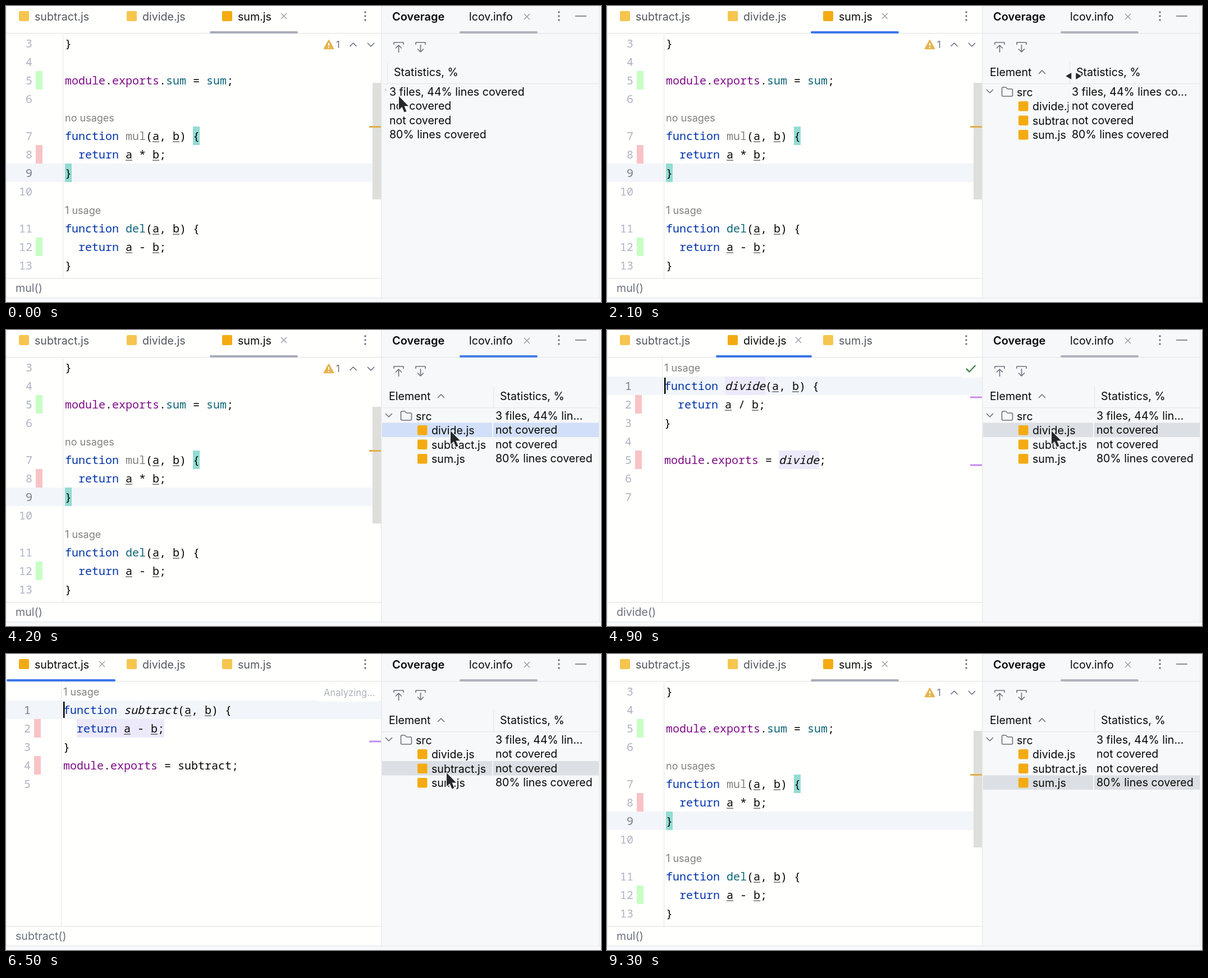
An HTML page with a canvas for the animation above (9400 ms loop, 1060 px wide and 528 px high).

```html
<!DOCTYPE html>
<html lang="en">
<head>
<meta charset="utf-8">
<title>Coverage panel</title>
<style>
  html, body { margin: 0; width: 100%; height: 100%; overflow: hidden; background: #fffffd; }
  canvas { display: block; }
</style>
</head>
<body>
<canvas id="stage" width="1060" height="528"></canvas>
<script>
const ctx = document.getElementById('stage').getContext('2d');
const LOOP = 9400, STEP = 100, LINE = 33, TOP = 50, CHAR = 12;
const UI = '19.6px Inter, sans-serif';
const HINT = '18px Inter, sans-serif';
const SMALL = '16.6px Inter, sans-serif';
const MONO = '20px "Noto Sans Mono", monospace';
const PAPER = '#fffffd', PANEL = '#f6f8f9', RULE = '#e7e9ec', ICON = '#6c707e';
const BLUE = '#3a76ea', IDLE = '#a9acba';
const GREEN = '#c8fdc4', RED = '#f8c3c6', BRACE = '#93dbd2', LAVENDER = '#ece9fa';
const INK = { k: '#0033a8', p: '#7d0b87', t: '#0b6478', g: '#808080', u: '#080808', i: '#080808' };

// Markup: <style:text>; lines starting with # are usage hints without a number.
const files = {
  subtract: {
    first: 1, current: 1, numbers: 44, x: 102, gutter: 98, crumb: 'subtract()',
    lines: ['#1 usage', '<k:function> <i:subtract>(<u:a>, <u:b>) {', '  <k:return> <u:a> - <u:b>;', '}',
      '<p:module>.<p:exports> = subtract;', ''],
    coverage: { 2: RED, 4: RED },
    marks: [[2, 2, 13, LAVENDER]], stripes: [156]
  },
  divide: {
    first: 1, current: 1, numbers: 44, x: 102, gutter: 98, crumb: 'divide()',
    lines: ['#1 usage', '<k:function> <i:divide>(<u:a>, <u:b>) {', '  <k:return> <u:a> / <u:b>;', '}', '',
      '<p:module>.<p:exports> = <i:divide>;', '', ''],
    coverage: { 2: RED, 5: RED },
    marks: [[1, 9, 6, LAVENDER], [5, 17, 6, LAVENDER]], stripes: [120, 241]
  },
  sum: {
    first: 3, current: 7, numbers: 47, x: 105, gutter: 101, crumb: 'mul()',
    lines: ['}', '', '<p:module>.<p:exports>.<t:sum> = <t:sum>;', '', '#no usages',
      '<k:function> <g:mul>(<u:a>, <u:b>) {', '  <k:return> <u:a> * <u:b>;', '}', '', '#1 usage',
      '<k:function> <t:del>(<u:a>, <u:b>) {', '  <k:return> <u:a> - <u:b>;', '}'],
    coverage: { 2: GREEN, 6: RED, 11: GREEN },
    marks: [[5, 19, 1, BRACE], [7, 0, 1, BRACE]], stripes: []
  }
};
const tabs = [
  { id: 'subtract', icon: 23, label: 51, close: 171, from: 1, to: 195 },
  { id: 'divide', icon: 215, label: 243, close: 341, from: 194, to: 365 },
  { id: 'sum', icon: 385, label: 413, close: 495, from: 363, to: 520 }
];
const stats = ['3 files, 44% lines covered', 'not covered', 'not covered', '80% lines covered'];

// Keys are [time, value, ...]; values are interpolated linearly.
const dividerKeys = [[1300, 679], [1600, 714], [2300, 868]];
const pointerKeys = [
  [300, 700, 161], [900, 702, 126], [1100, 694, 119], [1300, 694, 119], [1600, 722, 120],
  [2300, 875, 127], [2600, 875, 139], [2800, 875, 141], [3700, 796, 176], [4000, 792, 180],
  [5100, 792, 180], [5400, 788, 212], [5500, 786, 203], [6300, 786, 203], [6900, 783, 230],
  [8500, 783, 230], [9200, 1015, 12]
];

function track(keys, t) {
  const next = keys.findIndex(k => k[0] > t);
  if (next === 0) return keys[0].slice(1);
  if (next < 0) return keys[keys.length - 1].slice(1);
  const a = keys[next - 1], b = keys[next], f = (t - a[0]) / (b[0] - a[0]);
  return a.slice(1).map((v, i) => v + (b[i + 1] - v) * f);
}

const between = (t, a, b) => t >= a && t < b;

function stateAt(t) {
  const file = between(t, 4500, 6100) ? 'divide' : between(t, 6100, 7800) ? 'subtract' : 'sum';
  const panelFocus = between(t, 4200, 4500) || between(t, 5700, 6100) || between(t, 7300, 7800);
  const windowFocus = between(t, 1400, 9300);
  const blink = start => (t - start) % 1000 < 500;
  return {
    file, panelFocus,
    editorFocus: windowFocus && !panelFocus,
    caret: between(t, 1400, 4200) && blink(1400) || between(t, 4500, 5000) ||
      between(t, 6100, 7300) && blink(6100) || between(t, 7800, 8700),
    analyzing: between(t, 4500, 4900) || between(t, 6100, 6700),
    bulb: between(t, 5700, 6100) || between(t, 7100, 7800),
    selected: t < 4200 ? 0 : t < 5700 ? 1 : t < 7300 ? 2 : 3,
    divider: track(dividerKeys, t)[0],
    pointer: t < 9300 ? track(pointerKeys, t) : null,
    resizing: between(t, 1000, 2900)
  };
}

function box(x, y, w, h, color) {
  ctx.fillStyle = color;
  ctx.fillRect(x, y, w, h);
}

function rounded(x, y, w, h, r, color) {
  ctx.fillStyle = color;
  ctx.beginPath();
  ctx.roundRect(x, y, w, h, r);
  ctx.fill();
}

function text(string, x, y, color = '#080808', font = UI) {
  ctx.font = font;
  ctx.fillStyle = color;
  ctx.fillText(string, x, y);
}

function stroke(path, color = ICON, width = 1.6) {
  ctx.strokeStyle = color;
  ctx.lineWidth = width;
  ctx.stroke(new Path2D(path));
}

function polygon(path, x, y) {
  ctx.save();
  ctx.translate(x, y);
  const shape = new Path2D(path);
  ctx.lineJoin = 'round';
  ctx.strokeStyle = '#fff';
  ctx.lineWidth = 2.5;
  ctx.stroke(shape);
  ctx.fillStyle = '#25282c';
  ctx.fill(shape);
  ctx.restore();
}

const cross = (x, y) => stroke(`M${x - 5} ${y - 5}l10 10m0 -10l-10 10`, '#9598a5', 1.4);
const chevron = (x, y, dir) => stroke(`M${x - 6} ${y - 3 * dir}l6 ${6 * dir}l6 ${-6 * dir}`);

function dots(x) {
  for (const y of [11, 18, 25]) rounded(x - 1.7, y - 1.7, 3.4, 3.4, 1.7, ICON);
}

function shorten(string, room) {
  ctx.font = UI;
  if (ctx.measureText(string).width <= room) return string;
  while (string && ctx.measureText(string + '...').width > room) string = string.slice(0, -1);
  return string + '...';
}

function drawTabs(s) {
  box(0, 48, 668, 1.5, RULE);
  for (const tab of tabs) {
    const active = tab.id === s.file;
    rounded(tab.icon, 9, 18, 18, 2, active ? '#f4ab12' : '#f6c54f');
    text(tab.id + '.js', tab.label, 26, active ? '#080808' : '#54565e');
    if (!active) continue;
    cross(tab.close, 18);
    rounded(tab.from, 45, tab.to - tab.from, 4, 2, s.editorFocus ? BLUE : IDLE);
  }
  dots(640);
}

function drawCode(line, x, y) {
  for (const [raw, style, word] of line.matchAll(/<(\w):([^>]*)>|[^<]+/g)) {
    const part = word || raw;
    text(part, x, y, INK[style] || '#080808', (style === 'i' ? 'italic ' : '') + MONO);
    if (style === 'u') box(x, y + 2.5, CHAR, 1.2, '#444');
    x += part.length * CHAR;
  }
}

function drawEditor(s) {
  const file = files[s.file];
  const top = row => TOP + row * LINE;
  box(1, top(file.current), 667, LINE, '#f2f5f9');
  box(file.gutter, 50, 1.2, 435, RULE);
  for (const [row, col, count, color] of s.analyzing && s.file === 'divide' ? [] : file.marks)
    box(file.x + col * CHAR, top(row), count * CHAR, LINE, color);

  let number = file.first;
  file.lines.forEach((line, row) => {
    const base = top(row) + 24;
    if (line[0] === '#') return text(line.slice(1), file.x, base, '#808080', HINT);
    ctx.textAlign = 'right';
    text(number++, file.numbers, base, row === file.current ? '#767a8a' : '#aeb3c2', MONO);
    ctx.textAlign = 'left';
    if (file.coverage[row]) box(file.numbers + 6, top(row), 12, LINE, file.coverage[row]);
    drawCode(line, file.x, base);
  });

  if (s.file === 'sum') {
    drawWarnings();
    box(653, 137, 15, 208, '#dededb');
    box(647, 214, 21, 3, '#deb04d');
  } else {
    drawAnalysis(s.analyzing);
    for (const y of file.stripes) box(647, y - 1.5, 21, 3, '#c18df3');
  }
  if (s.caret) box(file.x + (s.file === 'sum' ? CHAR : 0), top(file.current) + 2, 2.5, 29, '#000');
  if (s.bulb) drawBulb();
  box(0, 485, 668, 1.5, RULE);
  text(file.crumb, 17, 510, ICON);
}

function drawWarnings() {
  ctx.fillStyle = '#e6b450';
  ctx.lineJoin = 'round';
  ctx.fill(new Path2D('M575 60.5L584 77H566Z'));
  stroke('M575 61.5L583 76H567Z', '#e6b450', 2.5);
  stroke('M575 66v5m0 2v2', '#fff', 2);
  text('1', 588, 75, ICON, SMALL);
  chevron(618.5, 69, -1);
  chevron(650, 69, 1);
}

function drawAnalysis(analyzing) {
  if (analyzing) {
    box(557, 55, 108, 30, PAPER);
    text('Analyzing...', 566, 75, '#aeb1bb', SMALL);
  } else {
    box(634, 55, 31, 30, PAPER);
    stroke('M640 69l5.5 5.5L656.500 63', '#4c8a55', 2.5);
  }
}

function drawBulb() {
  rounded(115, 124, 16, 16, 8, '#f3a90f');
  box(119, 137, 8, 4, '#f3a90f');
  stroke('M119 143h8m-6.500 3h5', '#4d4f55', 1.5);
}

function drawPanel(s) {
  box(668, 0, 392, 528, PANEL);
  text('Coverage', 688, 26, '#080808', '600 20px Inter, sans-serif');
  text('lcov.info', 825, 26);
  cross(928, 19);
  dots(985);
  stroke('M1014 18h20');
  box(668, 48, 388, 1.5, RULE);
  rounded(808, 45, 139, 4, 2, s.panelFocus ? '#4680e6' : '#b0b3be');
  stroke('M691 69v-4h17v4M699.500 83v-13m-5.500 5.500l5.500 -5.500l5.500 5.500');
  stroke('M730 69v-4h17v4M738.500 69v13m-5.500 -5.500l5.500 5.500l5.500 -5.500');
  drawTable(s);
  box(668, 0, 1.5, 520, RULE);
  box(1056, 0, 1.5, 520, RULE);
}

function drawTable(s) {
  const { divider, selected } = s;
  box(670, 138, 386, 1.3, RULE);
  box(divider, 100, 1.2, 38, RULE);
  if (selected) {
    const color = s.panelFocus ? '#d2dff8' : '#dcdfe3', y = 140 + selected * 25.5;
    box(670, y, divider - 672, 25.5, color);
    box(divider, y, 1056 - divider, 25.5, color);
  }

  ctx.save();
  ctx.beginPath();
  ctx.rect(670, 90, divider - 672, 400);
  ctx.clip();
  const title = shorten('Element', divider - 690);
  text(title, 682, 125);
  if (title === 'Element') chevron(775, 118, -1);
  chevron(682, 152, 1);
  stroke('M703.500 159v-12q0 -2 2 -2h5l3 3h7q2 0 2 2v9q0 2 -2 2h-15q-2 0 -2 -2Z');
  text('src', 730, 160.5);
  ['divide.js', 'subtract.js', 'sum.js'].forEach((name, i) => {
    rounded(733, 170 + i * 25.5, 17.5, 17.5, 2, '#f4ab12');
    text(name, 758, 186 + i * 25.5);
  });
  ctx.restore();

  text('Statistics, %', divider + 12, 125);
  stats.forEach((stat, i) => {
    const label = i ? stat : shorten(stat, 1038 - divider - 4);
    text(label, divider + 4, 159.5 + i * 25.5);
  });
}

function drawPointer({ pointer, resizing }) {
  if (!pointer) return;
  const shape = resizing
    ? 'M-14 0L-4 -6V6ZM14 0L4 -6V6Z'
    : 'M0 0V24L5.500 19L9.500 28.500L13.500 27L9.500 17.500H17Z';
  polygon(shape, ...pointer);
}

function draw(now) {
  const t = Math.floor(now % LOOP / STEP) * STEP;
  const s = stateAt(t);
  box(0, 0, 1060, 528, PAPER);
  drawTabs(s);
  drawEditor(s);
  drawPanel(s);
  box(0, 0, 1.2, 520, RULE);
  box(0, 520, 1060, 8, PANEL);
  box(0, 520, 1060, 1.3, RULE);
  drawPointer(s);
}

const start = performance.now();
function frame() {
  draw(performance.now() - start);
  requestAnimationFrame(frame);
}
frame();
</script>
</body>
</html>
```
